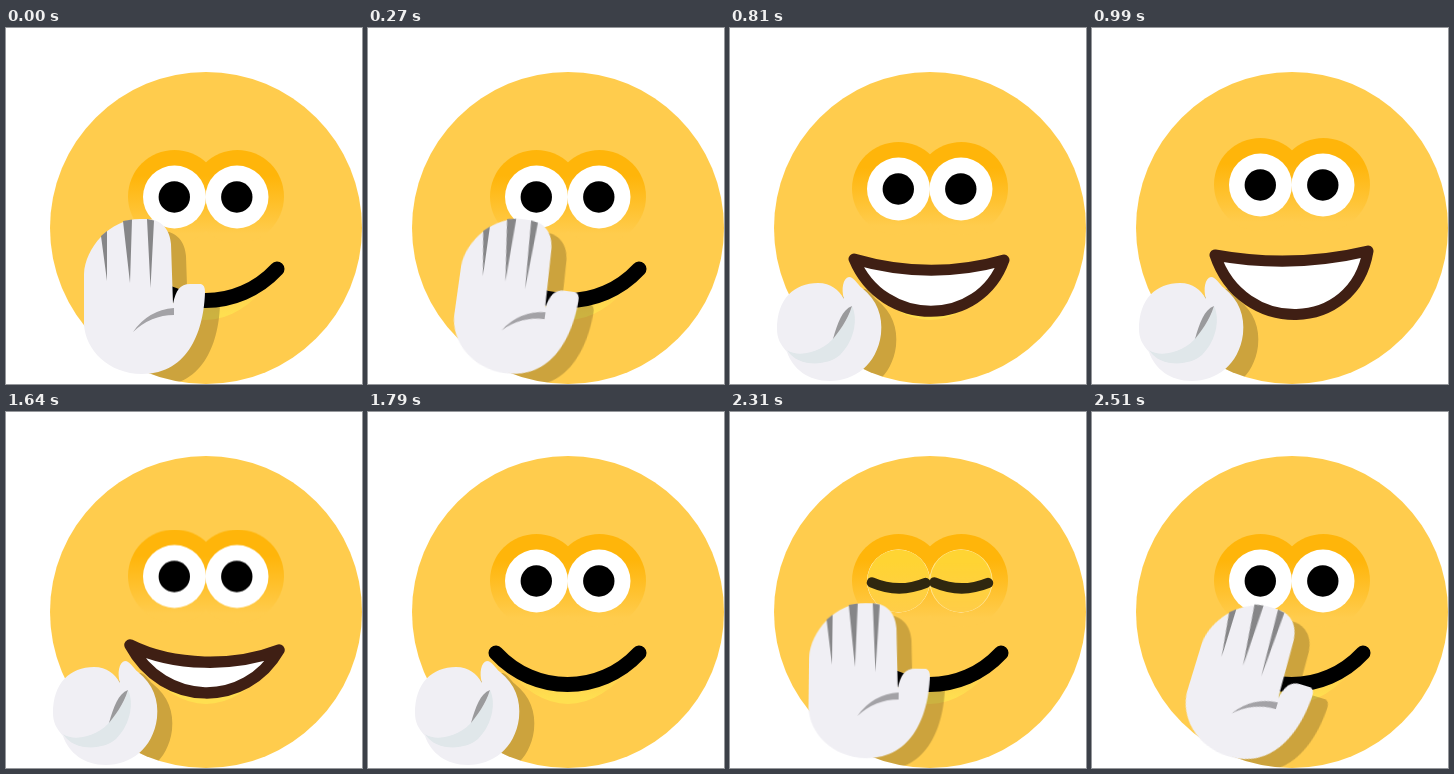
Animation, 356 px wide and 356 px high, one loop 2560 ms. Source, as an HTML page without scripts:

```html
<!DOCTYPE html>
<html lang="en">
<head>
<meta charset="utf-8">
<title>Waving smiley</title>
<style>
  html, body { margin: 0; width: 100%; height: 100%; overflow: hidden; background: #fff; }
  svg { display: block; width: 100vw; height: 100vh; }

  .eyes, .lid, .lash, .mouth, .wave, .open, .fist {
    animation: 2560ms step-end infinite;
  }
  .eyes  { animation-name: lift; }
  .lid   { animation-name: blink; }
  .lash  { animation-name: lash; }
  .mouth { animation-name: laugh; stroke-linecap: round; stroke-linejoin: round; }
  .wave  { animation-name: wave; transform-origin: 127px 337px; }
  .open  { animation-name: open; }
  .fist  { animation-name: fist; }

  @keyframes wave {
    0%     { transform: rotate(0deg); }
    3.51%  { transform: translateY(4px) rotate(-17deg); }
    7.03%  { transform: translateY(3px) rotate(-12deg); }
    10.54% { transform: translate(2px, -2px) rotate(8deg); }
    14.06% { transform: translate(3px, -4px) rotate(17deg); }
    17.57% { transform: rotate(0deg); }
    21.09% { transform: translateY(5px) rotate(-19.5deg); }
    24.6%  { transform: translateY(5px) rotate(-20deg) scaleY(.93); }
    28.12% { transform: translateY(5px) rotate(-20deg) scaleY(.76); }
    81.25% { transform: translateY(5px) rotate(-20deg) scaleY(.8); }
    84.76% { transform: translateY(5px) rotate(-19.5deg); }
    88.28% { transform: translateY(2px) rotate(-10deg); }
    90.23% { transform: rotate(.7deg); }
    92.18% { transform: translate(2px, -3px) rotate(10deg); }
    94.14% { transform: translate(3px, -4px) rotate(16deg); }
    96.09% { transform: translate(3px, -4px) rotate(19deg); }
    98.04% { transform: translate(3px, -4px) rotate(17deg); }
    100%   { transform: rotate(0deg); }
  }
  @keyframes open {
    0%, 81.25%, 100% { opacity: 1; }
    31.64% { opacity: 0; }
  }
  @keyframes fist {
    0%, 81.25%, 100% { opacity: 0; }
    31.64% { opacity: 1; }
  }
  @keyframes lift {
    0%     { transform: translateY(0); }
    24.6%  { transform: translateY(-1px); }
    28.12% { transform: translateY(-5px); }
    31.64% { transform: translateY(-8px); }
    35.15% { transform: translateY(-11px); }
    38.67% { transform: translateY(-12px); }
    64.06% { transform: translateY(-4.5px); }
    66.01% { transform: translateY(-2px); }
    67.96% { transform: translateY(-1px); }
    69.92%, 100% { transform: translateY(0); }
  }
  @keyframes blink {
    0%, 94.14%, 100% { transform: translateY(-66px); }
    88.28%, 92.18% { transform: translateY(-32px); }
    90.23% { transform: translateY(0); }
  }
  @keyframes lash {
    0%, 92.18%, 100% { opacity: 0; }
    90.23% { opacity: 1; }
  }
  @keyframes laugh {
    0%, 69.92%, 100% {
      d: path("M128 241C167 283 232 283 271 241C232 283 167 283 128 241Z");
      stroke: #000; stroke-width: 15px;
    }
    24.6%, 67.96% {
      d: path("M127 239C167 277 232 277 271 240C233 285 166 285 127 239Z");
      stroke: #160b07; stroke-width: 14px;
    }
    66.01% {
      d: path("M126 236C167 267 232 267 272 239C236 291 163 291 126 236Z");
      stroke: #2c160e; stroke-width: 12px;
    }
    28.12%, 64.06% {
      d: path("M124 233C168 255 229 255 273 238C240 296 158 296 124 233Z");
      stroke: #3f1f14; stroke-width: 11.5px;
    }
    31.64% {
      d: path("M124 231Q200 253 274 232C250 300 153 301 124 231Z");
      stroke: #3f1f14; stroke-width: 11px;
    }
    35.15% {
      d: path("M123 228Q200 244 276 225C259 304 151 306 123 228Z");
      stroke: #3f1f14; stroke-width: 11px;
    }
    38.67% {
      d: path("M123 227Q200 241 276 223C262 306 150 308 123 227Z");
      stroke: #3f1f14; stroke-width: 11px;
    }
  }
</style>
</head>
<body>
<svg viewBox="0 0 356 356" aria-label="Smiley waving a gloved hand">
  <defs>
    <clipPath id="face"><circle cx="200" cy="200" r="156"/></clipPath>
    <clipPath id="eyeClip"><circle cx="168.5" cy="169" r="31.3"/></clipPath>

    <linearGradient id="glow" gradientUnits="userSpaceOnUse" x1="0" y1="148" x2="0" y2="206">
      <stop stop-color="#ffb50a"/>
      <stop offset="1" stop-color="#ffcc4d"/>
    </linearGradient>
    <linearGradient id="lidFill" x2="0" y2="1">
      <stop offset=".2" stop-color="#ffd433"/>
      <stop offset="1" stop-color="#ffcd48"/>
    </linearGradient>
    <linearGradient id="lip" gradientUnits="userSpaceOnUse" x1="0" y1="258" x2="0" y2="286">
      <stop stop-color="#ffcc4d"/>
      <stop offset="1" stop-color="#ffdf50"/>
    </linearGradient>

    <path id="palm" d="M134 191H140C156 191 164 202 165 216L167 276C170 262 174 256 184 256H195Q199 257 199 264C198 300 184 346 136 346C103 346 79 322 78 296V246C79 220 104 191 134 191Z"/>
    <path id="knuckles" d="M88 255C101 255 109 262 114 271C111 261 113 250 119 249C124 249 127 256 132 260C147 272 153 288 151 306C147 337 124 353 100 353C78 353 63 341 57 324C50 316 47 310 47 301C47 271 64 255 88 255Z"/>

    <g id="eye">
      <circle cx="168.5" cy="169" r="31.5" fill="#fff"/>
      <circle cx="168.3" cy="169" r="15.7"/>
    </g>
    <path id="lashLine" d="M142 170.5Q168.5 182 195.5 171" fill="none" stroke="#30270f" stroke-width="10.5" stroke-linecap="round"/>
  </defs>

  <circle cx="200" cy="200" r="156" fill="#ffcc4d"/>

  <g class="eyes">
    <g fill="url(#glow)">
      <circle cx="168.5" cy="168.5" r="46.5"/>
      <circle cx="231.5" cy="168.5" r="46.5"/>
    </g>
    <use href="#eye"/>
    <use href="#eye" x="62.5"/>
    <g clip-path="url(#eyeClip)">
      <circle class="lid" cx="168.5" cy="169" r="32" fill="url(#lidFill)"/>
    </g>
    <g transform="translate(62.5)">
      <g clip-path="url(#eyeClip)">
        <circle class="lid" cx="168.5" cy="169" r="32" fill="url(#lidFill)"/>
      </g>
    </g>
    <g class="lash">
      <use href="#lashLine"/>
      <use href="#lashLine" x="62.5"/>
    </g>
  </g>

  <path d="M132 250Q200 334 268 250Q200 304 132 250Z" fill="url(#lip)"/>
  <path class="mouth" d="M128 241C167 283 232 283 271 241C232 283 167 283 128 241Z" fill="#fff" stroke="#000" stroke-width="15"/>

  <!-- cast shadow, kept on the face -->
  <g clip-path="url(#face)">
    <g transform="translate(15 12)" opacity=".2">
      <g class="open"><use class="wave" href="#palm"/></g>
      <g class="fist"><use href="#knuckles"/></g>
    </g>
  </g>

  <g class="open">
    <g class="wave">
      <use href="#palm" fill="#f0eff4"/>
      <path d="M95 208L101 203V253ZM117 193L126 191.5L124 255ZM141 191L148 192.5L144.5 260Z" fill="#868688"/>
      <path d="M127 304Q142 282 168 280V287Q145 287 127 304Z" fill="#a3a2a6"/>
    </g>
  </g>

  <g class="fist">
    <use href="#knuckles" fill="#f0eff4"/>
    <path d="M57 322C70 331 96 322 104 309C112 300 120 288 122 278C128 290 125 312 110 327C98 338 68 340 57 322Z" fill="#e0e7ea"/>
    <path d="M122 278C112 282 108 294 103 311C109 303 117 294 122 278Z" fill="#9a9a9c"/>
  </g>
</svg>
</body>
</html>
```
